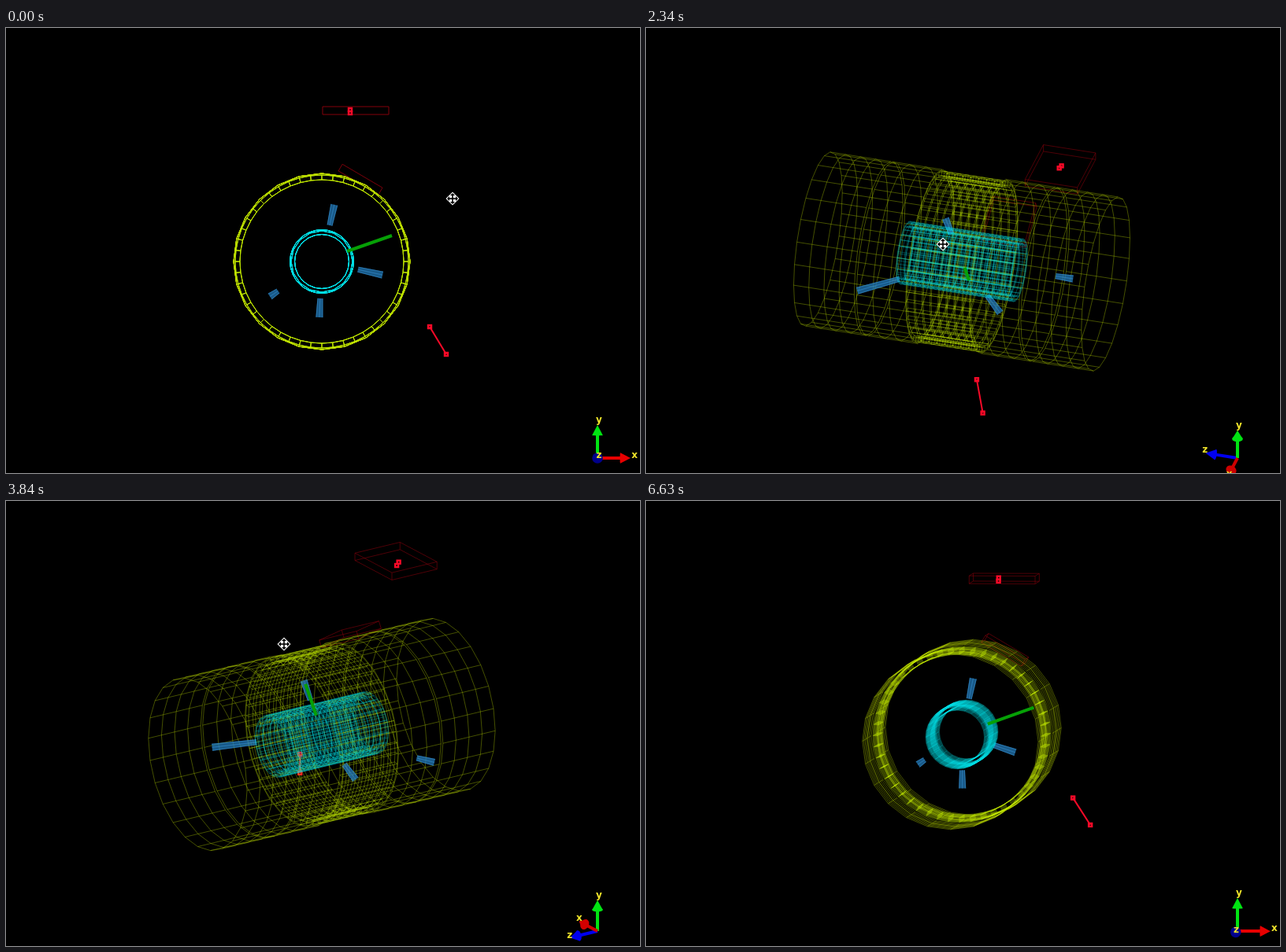
An HTML page with a canvas that plays this animation: 805 by 566 pixels, repeating every 8000 ms.

```html
<!DOCTYPE html>
<html lang="en">
<head>
<meta charset="utf-8">
<title>Detector view</title>
<style>
html, body { margin: 0; width: 100%; height: 100%; overflow: hidden; background: #000; }
canvas { display: block; width: 805px; height: 566px; }
</style>
</head>
<body>
<canvas id="view" width="805" height="566"></canvas>
<script>
const ctx = document.getElementById('view').getContext('2d');
const LOOP = 8000, TAU = Math.PI * 2, DEG = TAU / 360;
const CX = 401, CY = 297;
const STEP = 100;         // redraw interval while dragging
const LEAD = 60;          // the pointer runs ahead of the scene
const DEG_PER_PX = 0.56;  // drag sensitivity

const drags = [
  [660, 1460], [1540, 2340], [2670, 2760], [2910, 3630],
  [3750, 4540], [4660, 4870], [5020, 5140]
];
// Turning points of the view: time, yaw, pitch
const poses = [
  [560, 0, 0], [1060, 45, 31], [1460, 58, 31], [1740, 75, 32],
  [2340, 106, 33], [2760, 107, 30], [3320, 115, -3], [3630, 121, -12],
  [3850, 124, -21], [4440, 81, -9], [4870, 37, 0], [5140, 4.4, 2.7]
];

function steppedTime(t) {
  const drag = drags.findLast(d => d[0] <= t);
  if (!drag) return 0;
  const [start, end] = drag;
  const n = Math.round((end - start) / STEP);
  const dt = (end - start) / n;
  return start + dt * Math.min(n, Math.floor((t - start) / dt + 0.15));
}

function poseAt(t) {
  const i = poses.findIndex(p => p[0] >= t);
  if (i <= 0) return poses.at(i);
  const a = poses[i - 1], b = poses[i];
  const u = (t - a[0]) / (b[0] - a[0]);
  return a.map((v, k) => v + (b[k] - v) * u);
}

let cosA, sinA, cosP, sinP;
function setView(yaw, pitch) {
  cosA = Math.cos(yaw * DEG); sinA = Math.sin(yaw * DEG);
  cosP = Math.cos(pitch * DEG); sinP = Math.sin(pitch * DEG);
}
function turn([x, y, z]) {
  const d = z * cosA + x * sinA;
  return [x * cosA - z * sinA, d * sinP - y * cosP, d * cosP + y * sinP];
}
function project(p) {
  const q = turn(p);
  return [CX + q[0], CY + q[1]];
}
const polar = (r, a, z) => [r * Math.cos(a), r * Math.sin(a), z];

function pen(color, width) {
  ctx.strokeStyle = color;
  ctx.lineWidth = width;
}
function line(...points) {
  ctx.beginPath();
  for (const p of points) ctx.lineTo(...project(p));
  ctx.stroke();
}
function polygon(points) {
  ctx.beginPath();
  for (const p of points) ctx.lineTo(...p);
  ctx.closePath();
}
function ring(r, z, sides) {
  polygon(Array.from({ length: sides }, (_, i) => project(polar(r, i / sides * TAU, z))));
  ctx.stroke();
}
// Wire tube between z0 and z1
function tube(r, z0, z1, sides, rows) {
  for (let i = 0; i <= rows; i++) ring(r, z0 + (z1 - z0) * i / rows, sides);
  for (let i = 0; i < sides; i++) {
    const a = i / sides * TAU;
    line(polar(r, a, z0), polar(r, a, z1));
  }
}

function drawCalorimeter() {
  pen('rgba(190,222,0,.36)', 1);
  for (const s of [-1, 1]) {
    tube(112, s * 42, s * 107, 24, 3);
    tube(112, s * 110, s * 190, 24, 4);
  }
  pen('rgba(200,240,0,.32)', 1);
  const rows = 8, cells = 48, half = 42;
  tube(104, -half, half, cells, rows);
  tube(110, -half, half, cells, rows);
  for (let k = 0; k <= rows; k++) {
    const z = half * (2 * k / rows - 1);
    for (let i = 0; i < cells; i++) {
      const a = i / cells * TAU;
      line(polar(104, a, z), polar(110, a, z));
    }
  }
}

function drawTracker() {
  pen('rgba(0,230,235,.28)', 1);
  tube(40.3, -75, 75, 32, 26);
  tube(39, -75, 75, 16, 14);
  tube(34.5, -75, 75, 24, 18);
}

// Energy towers point away from the centre: angle, inner and outer radius, z per radius
const towers = [
  [77.7, 47, 74, 0.23], [-12.5, 47, 79, 1.47],
  [-92.5, 47, 71, -0.7], [214, 67, 79.5, -1.61]
];
function drawTowers() {
  for (const [angle, r0, r1, slope] of towers) {
    const p = project(polar(r0, angle * DEG, r0 * slope));
    const q = project(polar(r1, angle * DEG, r1 * slope));
    const len = Math.hypot(q[0] - p[0], q[1] - p[1]) || 1;
    const nx = (p[1] - q[1]) / len, ny = (q[0] - p[0]) / len;
    const near = off => [p[0] + nx * off * 3.4, p[1] + ny * off * 3.4];
    const far = off => [q[0] + nx * off * 4.5, q[1] + ny * off * 4.5];
    ctx.fillStyle = 'rgba(34,125,190,.72)';
    polygon([near(-1), far(-1), far(1), near(1)]);
    ctx.fill();
    pen('rgba(60,150,215,.3)', 1);
    for (const off of [-0.9, 0, 0.9]) {
      polygon([near(off), far(off)]);
      ctx.stroke();
    }
  }
}

// Wire box, tilted about the beam axis
function chamber(x, y, tilt, w, h, z0, z1) {
  const c = Math.cos(tilt * DEG), s = Math.sin(tilt * DEG);
  const corner = (i, z) => {
    const u = (i % 4 === 1 || i % 4 === 2 ? w : -w) / 2;
    const v = (i % 4 > 1 ? h : -h) / 2;
    return [x + u * c - v * s, y + u * s + v * c, z];
  };
  for (let i = 0; i < 4; i++) {
    line(corner(i, z0), corner(i + 1, z0));
    line(corner(i, z1), corner(i + 1, z1));
    line(corner(i, z0), corner(i, z1));
  }
}
function marker(p) {
  const [x, y] = project(p);
  ctx.strokeRect(x - 2, y - 2, 4, 4);
}
function drawMuons() {
  pen('rgba(130,0,12,.6)', 1);
  chamber(43, 192, 0, 84, 10, -177, -108);
  chamber(49, 104.5, -30.5, 59, 10, -105, -48);
  pen('#f80a28', 2.4);
  marker([36, 193, -142]);
  marker([36, 189, -139]);
  const a = [137, -83, -59], b = [158, -118, -73];
  marker(a);
  marker(b);
  pen('#f80a28', 2);
  line(a, b);
}

function drawTrack() {
  pen('#06a006', 4);
  line([32, 13, -13], [89, 33, -35]);
}

const axes = [
  { name: 'x', dir: [1, 0, 0], rgb: [232, 0, 0] },
  { name: 'y', dir: [0, 1, 0], rgb: [0, 228, 18] },
  { name: 'z', dir: [0, 0, 1], rgb: [0, 0, 240] }
];
function drawAxes() {
  const ox = 751, oy = 547;
  const list = axes.map(a => ({ ...a, v: turn(a.dir) })).sort((a, b) => a.v[2] - b.v[2]);
  for (const { rgb, v } of list) {
    const shade = 1 - 0.42 * v[2] ** 6;
    const color = `rgb(${rgb.map(c => Math.round(c * shade))})`;
    const at = d => [ox + v[0] * d, oy + v[1] * d];
    const base = at(29), ang = Math.atan2(v[1], v[0]);
    pen(color, 4);
    polygon([[ox, oy], base]);
    ctx.stroke();
    ctx.fillStyle = color;
    ctx.beginPath();
    ctx.ellipse(...base, Math.max(0.5, 6.8 * Math.abs(v[2])), 6.8, ang, 0, TAU);
    ctx.fill();
    const nx = -Math.sin(ang) * 6.8, ny = Math.cos(ang) * 6.8;
    polygon([[base[0] + nx, base[1] + ny], at(42), [base[0] - nx, base[1] - ny]]);
    ctx.fill();
  }
  ctx.fillStyle = '#f2e62a';
  ctx.font = 'bold 12px "DejaVu Sans", sans-serif';
  ctx.textAlign = 'center';
  for (const { name, v } of list) {
    ctx.fillText(name, ox + 2 + v[0] * 45, oy + v[1] * 45);
  }
}

function drawPointer(yaw, pitch) {
  ctx.save();
  ctx.translate(Math.round(567 - yaw / DEG_PER_PX), Math.round(217 + pitch / DEG_PER_PX));
  ctx.fillStyle = '#fff';
  polygon([[8.5, 0], [0, 8.5], [-8.5, 0], [0, -8.5]]);
  ctx.fill();
  ctx.fillStyle = '#000';
  for (let i = 0; i < 4; i++) {
    ctx.rotate(TAU / 4);
    ctx.fillRect(0, -0.8, 5, 1.6);
    polygon([[7, 0], [4, -3], [4, 3]]);
    ctx.fill();
  }
  ctx.restore();
}

function draw(t) {
  const shown = steppedTime(t);
  const [, yaw, pitch] = poseAt(shown);
  setView(yaw, pitch);
  ctx.fillStyle = '#000';
  ctx.fillRect(0, 0, 805, 566);
  drawMuons();
  drawCalorimeter();
  drawTowers();
  drawTracker();
  drawTrack();
  drawAxes();
  if (t < 6120) {
    const [, aheadYaw, aheadPitch] = poseAt(shown + LEAD);
    drawPointer(aheadYaw, aheadPitch);
  }
}

const begin = performance.now();
function tick() {
  draw((performance.now() - begin) % LOOP);
  requestAnimationFrame(tick);
}
tick();
</script>
</body>
</html>
```
